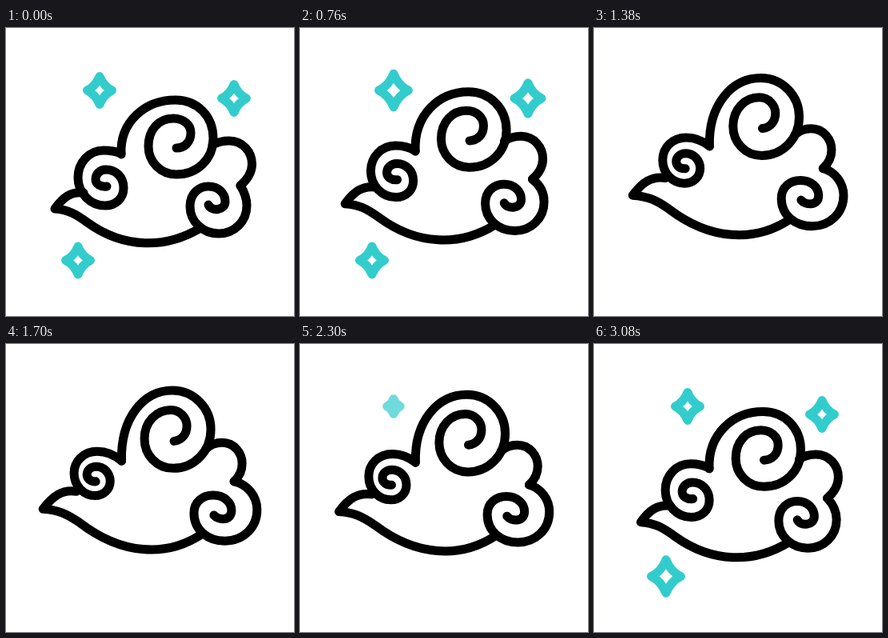
Write an HTML page that moves like this. It is 360 px wide and 360 px high and loops after 3.1 s.

```html
<!DOCTYPE html>
<html lang="en">
<head>
<meta charset="utf-8">
<title>Cloud and sparkles</title>
<style>
  html, body { margin: 0; width: 100%; height: 100%; overflow: hidden; background: #fff; }
  svg { display: block; width: 100vw; height: 100vh; }
  path { fill: none; stroke-width: 11; stroke-linecap: round; stroke-linejoin: round; }
  #cloud { stroke: #000; }
  #stars { stroke: #33cccc; }
</style>
</head>
<body>
<svg viewBox="0 0 360 360"><g id="stars"></g><g id="cloud"></g></svg>
<script>
const LOOP = 3100, STEP = 20;
const REST = 110, HALF_SWAY = 1715;
const BIG = 1.19, TINY = 0.2;
const SWELL = 430, SHRINK = 180, GROW = 480, SETTLE = 215;

// Each strand of the cloud: its resting pose and its puffed-up pose.
const strands = [
  // large top curl
  ['M144 158C142 118 173 90 212 90C239 90 259 110 259 138C259 164 239 183 213 183C193 183 178 167 178 148C178 127 191 113 209 113C222 113 231 121 231 131C231 143 223 150 213 150',
   'M144.5 146C143 92 172 57.5 208 57.5C235 57.5 256 80 256 106C256 134 235 155 209 155C188 155 173 138 173 118C173 96 189 82 206 82C218 82 226 92 226 102C226 113 219 120 210 121'],
  // right lobe
  ['M258 146C266 142 273 141 279 141C296 141 307.5 155 307.5 170C307.5 182 301 190 293 197',
   'M250 131C256 125 262 123 270 123C286 123 295 137 295 149C295 159 291 166 285 171.5'],
  // lower right curl
  ['M293 197C298 205 301 213 301 222C301 242 285 257 266 257C246 257 230 242 230 223C230 207 241 198 253 198C266 198 274 207 274 217C274 228 257 230 253 221',
   'M285 171.5C302 175 314 190 314 207C314 229 297 246 274 246C252 246 235 232 235 211C235 197 246 189 259 189C273 189 282 198 282 208C282 222 265 220 260 214'],
  // left curl
  ['M144 157C137 154 130 153 122 153C104 153 90 168 90 187C90 206 105 222 124 222C137 222 147 213 147 200C147 186 137 177 125 177C117 177 112 183 112 189C112 195 118 199 126 198',
   'M144.5 146C135 138 124 134 114 134C97 134 85 146 85 161C85 178 98 189 111 189C122 189 130 181 130 171C130 161 122 153 113 153C105 153 101 158 101 163C101 168 106 172 112 171.5'],
  // tail and underside
  ['M97 206C81 204 71 212 61 226C78 227 88 233 103 244C148 276 200 276 243 250',
   'M88 184C70 181 58 190 46 206C65 207 76 212 92 223C144 263 200 267 244 238']
];

const stars = [
  { x: 117, y: 78, delay: 0 },
  { x: 285, y: 88, delay: 215 },
  { x: 90, y: 290.5, delay: 430 }
];

const clamp = v => Math.max(0, Math.min(1, v));
const mix = (a, b, k) => a + (b - a) * k;
const smooth = v => { const x = clamp(v); return x * x * (3 - 2 * x); };

function addPath(groupId) {
  const path = document.createElementNS('http://www.w3.org/2000/svg', 'path');
  return document.getElementById(groupId).appendChild(path);
}

function morph([from, to], k) {
  const number = /[\d.]+/g;
  const ends = to.match(number);
  let i = 0;
  return from.replace(number, n => mix(+n, +ends[i++], k).toFixed(2));
}

function starPath(x, y, s) {
  const a = 15.5 * s, b = 17.5 * s, c = 5 * s;
  return `M${x} ${y - b}Q${x + c} ${y - c} ${x + a} ${y}Q${x + c} ${y + c} ${x} ${y + b}` +
         `Q${x - c} ${y + c} ${x - a} ${y}Q${x - c} ${y - c} ${x} ${y - b}Z`;
}

// Swell and vanish, then pop in again and settle.
function starState(t) {
  const peak = 760, appear = 2170;
  if (t < peak) return { size: mix(1, BIG, smooth((t - peak + SWELL) / SWELL)), alpha: 1 };
  if (t < appear) {
    const k = clamp((t - peak) / SHRINK);
    return { size: mix(BIG, TINY, k * k), alpha: 1 - k * k };
  }
  const age = t - appear;
  const size = age < GROW
    ? mix(TINY, BIG, 1 - Math.pow(1 - age / GROW, 1.3))
    : mix(BIG, 1, smooth((age - GROW) / SETTLE));
  return { size, alpha: clamp(age / 185) };
}

const cloudPaths = strands.map(() => addPath('cloud'));
const starPaths = stars.map(() => addPath('stars'));

function draw(now) {
  const t = Math.floor(now % LOOP / STEP) * STEP;
  const sway = (1 - Math.cos(Math.PI * Math.max(0, t - REST) / HALF_SWAY)) / 2;
  strands.forEach((poses, i) => cloudPaths[i].setAttribute('d', morph(poses, sway)));
  stars.forEach(({ x, y, delay }, i) => {
    const { size, alpha } = starState(t - delay);
    starPaths[i].setAttribute('d', starPath(x, y, size));
    starPaths[i].setAttribute('opacity', alpha);
  });
}

const start = performance.now();
function tick() {
  draw(performance.now() - start);
  requestAnimationFrame(tick);
}
tick();
</script>
</body>
</html>
```
